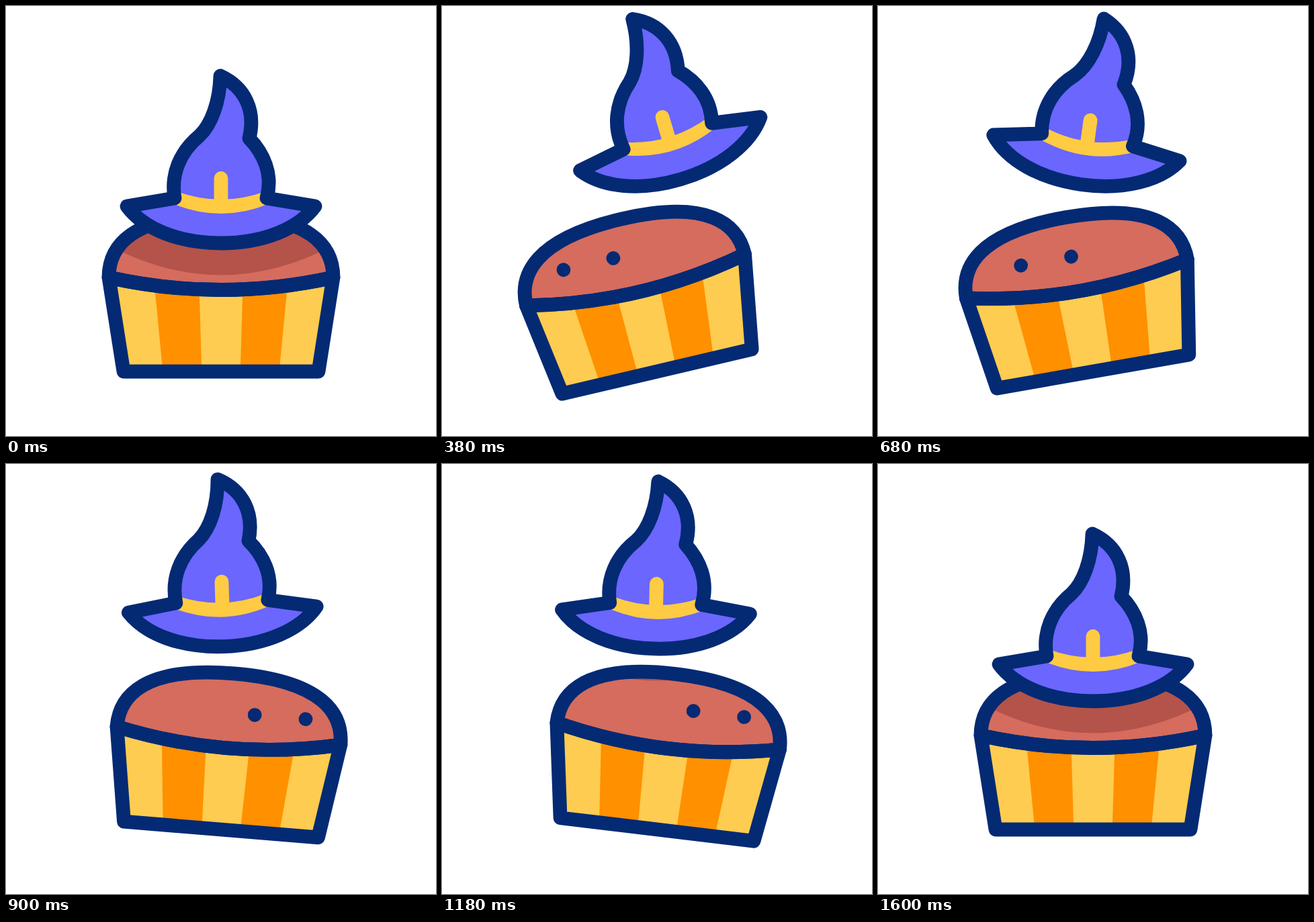
Write an HTML page that moves like this. It is 640 px wide and 640 px high and loops after 1.96 s.

```html
<!DOCTYPE html>
<html lang="en">
<head>
<meta charset="utf-8">
<title>Witch hat cupcake</title>
<style>
  html, body { margin: 0; width: 100%; height: 100%; overflow: hidden; background: #fff; }
  svg { display: block; width: 100vw; height: 100vh; }
  .line { fill: none; stroke: #042a74; stroke-width: 20.8; stroke-linejoin: round; }
</style>
</head>
<body>
<svg viewBox="0 0 640 640">
  <defs>
    <path id="dome" d="M153 404C153 358 186 311 320 311S487 358 487 404Q320 441 153 404Z"/>
    <path id="cup" d="M153 404Q320 441 487 404L465 544H175Z"/>
    <path id="stripe" d="M221 416L233.4 544H291.3L287.5 416Z"/>
    <path id="cone" d="M319 104C356 121 372 156 362 197C383 219 398 250 388 286L460 298C435 332 382 353 320 353S205 332 180 298L251 286C245 250 259 217 288 193C306 176 318 142 319 104Z"/>
    <clipPath id="domeClip"><use href="#dome" class="cake"/></clipPath>
  </defs>

  <g class="cake">
    <use href="#cup" fill="#fecc50"/>
    <g fill="#ff9000">
      <use href="#stripe"/>
      <use href="#stripe" transform="matrix(-1 0 0 1 640 0)"/>
    </g>
    <use href="#dome" fill="#d56c5e"/>
  </g>
  <g clip-path="url(#domeClip)">
    <path class="hat" fill="#b4534a" d="M120 200V337Q320 464 520 337V200Z"/>
  </g>
  <g class="cake">
    <use href="#cup" class="line"/>
    <use href="#dome" class="line"/>
    <g class="eyes" fill="#042a74">
      <circle cx="282" r="10.4"/>
      <circle cx="358" r="10.4"/>
    </g>
  </g>

  <g class="hat">
    <use href="#cone" fill="#6b66fd"/>
    <path fill="#ffcb42" d="M254 276Q320 300 386 276L392 294Q320 324 248 294Z"/>
    <path d="M320 256.5V295" stroke="#ffcb42" stroke-width="20.8" stroke-linecap="round"/>
    <use href="#cone" class="line"/>
  </g>
</svg>
<script>
  const LOOP = 1960, STEP = 20;

  // Smooth rise from 0 to 1 between two times in ms
  function ramp(t, from, to) {
    const s = Math.min(1, Math.max(0, (t - from) / (to - from)));
    return s * s * (3 - 2 * s);
  }

  function place(selector, transform) {
    for (const el of document.querySelectorAll(selector)) el.setAttribute('transform', transform);
  }

  function draw(now) {
    const t = Math.floor(now % LOOP / STEP) * STEP;

    // The cake tips left, then right, then settles
    const tilt = -16 * ramp(t, 20, 510) + 25 * ramp(t, 510, 1040) - 9 * ramp(t, 1040, 1480);

    // The hat pops up, rocks to rest in the air and drops back
    const lift = 90 * ramp(t, 0, 370) - 12 * ramp(t, 370, 1180) - 78 * ramp(t, 1270, 1600);
    const rock = -16.6 * ramp(t, 0, 370) + 24.7 * ramp(t, 370, 660) - 10 * ramp(t, 660, 910)
      + 3.2 * ramp(t, 910, 1170) - 1.3 * ramp(t, 1170, 1500);

    // The eyes come out looking left, glance right and hide again
    const peek = ramp(t, 0, 536), glance = ramp(t, 536, 1020), hide = ramp(t, 1020, 1455);
    const eyeX = -79 * peek + 181 * glance - 102 * hide;
    const eyeY = 345.3 + 24.7 * (peek - hide);

    place('.cake', `rotate(${tilt} 320 544)`);
    place('.hat', `translate(0 ${-lift}) rotate(${rock} 320 228.5)`);
    place('.eyes', `translate(${eyeX} ${eyeY})`);
  }

  const start = performance.now();
  function tick() {
    draw(performance.now() - start);
    requestAnimationFrame(tick);
  }
  tick();
</script>
</body>
</html>
```
